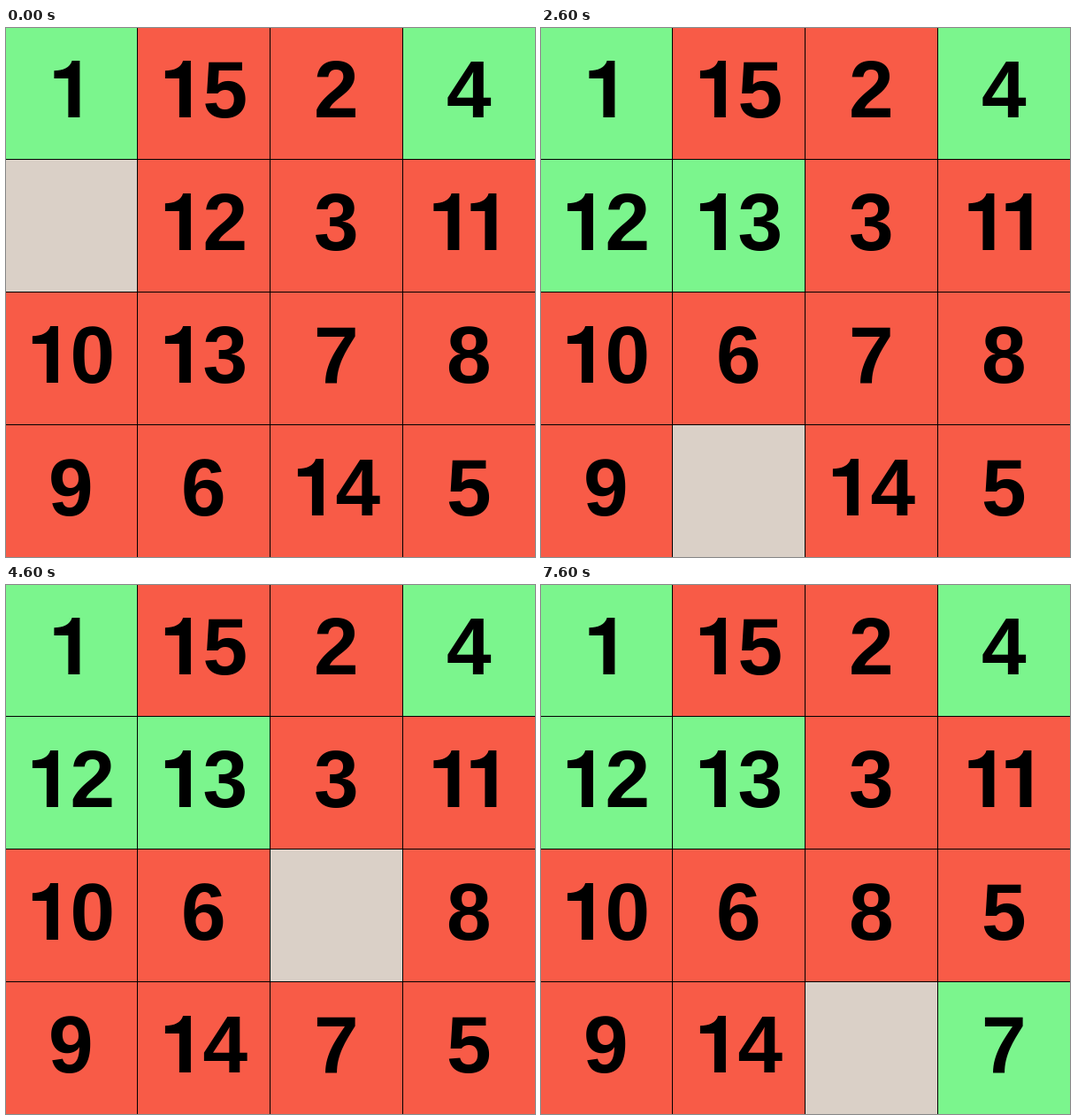
An HTML page that plays this animation: 598x598 px, repeating every 8000 ms.

```html
<!DOCTYPE html>
<html lang="en">
<head>
<meta charset="utf-8">
<title>Sliding number puzzle</title>
<style>
  html, body { margin: 0; width: 100%; height: 100%; overflow: hidden; background: #000; }
  svg { display: block; width: 598px; height: 598px; }
  text { font: bold 91px "Liberation Sans", Arial, sans-serif; text-anchor: middle; }
  .one { fill: none; }
</style>
</head>
<body>
<svg id="board" viewBox="0 0 598 598"></svg>
<script>
const SIZE = 4, PITCH = 150, CELL = 149, CENTER = 74.4, BASELINE = 102, LOOP = 8000;
const RED = '#f85b47', GREEN = '#7bf58d', EMPTY = '#dad0c7';
// Flag-topped numeral without a foot, drawn around its centre on the baseline
const ONE = 'M10 0H-3V-44H-19V-52.8C-9 -53 -1 -56 1.2 -64H10Z';

const START = [1, 15, 2, 4, 0, 12, 3, 11, 10, 13, 7, 8, 9, 6, 14, 5];
const SPIRAL = [1, 2, 3, 4, 12, 13, 14, 5, 11, 0, 15, 6, 10, 9, 8, 7];
const MOVES = [[500, 12], [1500, 13], [2600, 6], [3600, 14],
               [4600, 7], [5600, 8], [6600, 5], [7600, 7]];

function make(parent, name, attrs) {
  const el = document.createElementNS('http://www.w3.org/2000/svg', name);
  for (const key in attrs) el.setAttribute(key, attrs[key]);
  return parent.appendChild(el);
}

function makeTile(n) {
  const g = make(board, 'g', {});
  const rect = make(g, 'rect', { width: CELL, height: CELL });
  if (n) {
    const digits = String(n);
    const text = make(g, 'text', { y: BASELINE });
    const half = digits.length < 2 ? 0 : n === 11 ? 21 : 24.5;
    [...digits].forEach((digit, i) => {
      const x = CENTER + (i ? half : -half);
      const span = make(text, 'tspan', { x });
      span.textContent = digit;
      if (digit === '1') {
        span.setAttribute('class', 'one');
        make(g, 'path', { d: ONE, transform: `translate(${x} ${BASELINE})` });
      }
    });
  }
  return { g, rect };
}

const board = document.getElementById('board');
const tiles = START.map((_, n) => makeTile(n));

// Board after each move: the moved tile swaps with the gap
const states = [START];
for (const [, n] of MOVES) {
  const prev = states[states.length - 1];
  states.push(prev.map(v => v === n ? 0 : v === 0 ? n : v));
}

let shown = -1;
function draw(time) {
  const step = MOVES.filter(([at]) => at <= time).length;
  if (step === shown) return;
  shown = step;
  states[step].forEach((n, i) => {
    const x = (i % SIZE) * PITCH - 1, y = Math.floor(i / SIZE) * PITCH - 1;
    tiles[n].g.setAttribute('transform', `translate(${x} ${y})`);
    tiles[n].rect.setAttribute('fill', !n ? EMPTY : SPIRAL[i] === n ? GREEN : RED);
  });
}

const begin = performance.now();
function tick() {
  draw((performance.now() - begin) % LOOP);
  requestAnimationFrame(tick);
}
tick();
</script>
</body>
</html>
```
